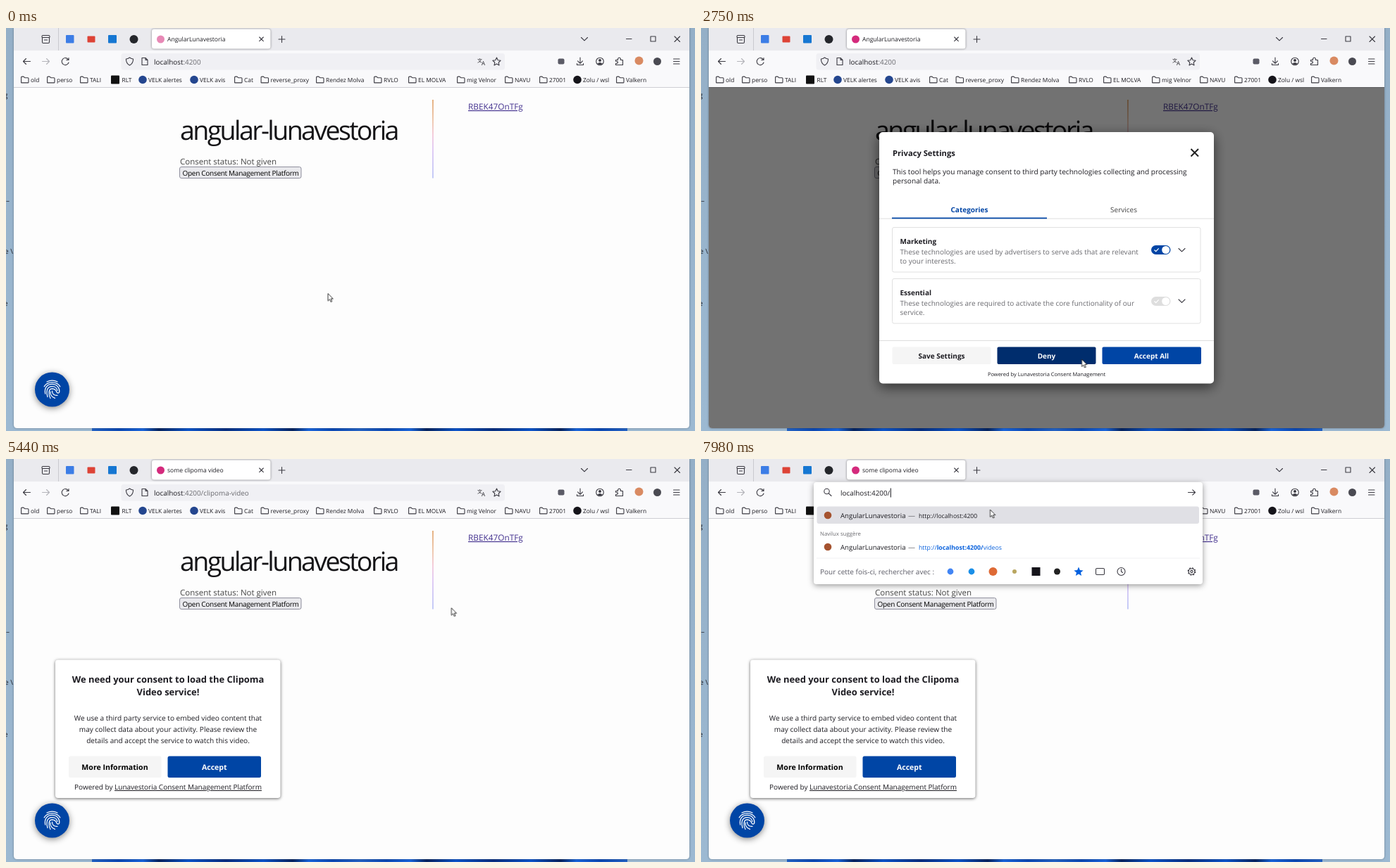
Recreate the animation shown at these times as an HTML page. Size 978x573 px, loop 8 s.

```html
<!DOCTYPE html>
<html lang="en">
<head>
<meta charset="utf-8">
<title>Consent demo</title>
<style>
html, body { margin: 0; width: 100%; height: 100%; overflow: hidden; background: #96b1c9; }
svg { display: block; width: 100%; height: 100%; }
text { font-family: "Open Sans", "Noto Sans", sans-serif; fill: #1d1c22; font-size: 10px; white-space: pre; text-rendering: geometricPrecision; }
.b { font-weight: 700; }
.mid { text-anchor: middle; }
.grey { fill: #6b6b70; }
.white { fill: #fff; }
.link { text-decoration: underline; }
.mark { font-size: 8.4px; }
.tab { font-size: 8.55px; }
.url { font-size: 9.9px; }
.line { fill: none; stroke: #3b3a42; stroke-width: 1.1; stroke-linecap: round; stroke-linejoin: round; }
.drop { filter: drop-shadow(0 2px 4px #0006); }

/* one loop is 8 s, so 1% is 80 ms */
.sw { animation: 8s step-end infinite; }
#favicon { animation-name: favicon; }
#finger { animation-name: finger; }
#homeTab { animation-name: before; }
#videoTab, #card { animation-name: after; }
#path { animation-name: path; }
#wide { animation-name: wide; }
#short { animation-name: short; }
#deny { animation-name: deny; }
#arrow { animation-name: arrow; }
#hand { animation-name: hand; }
#beam { animation-name: beam; }
#press { animation-name: press; }
#modal { animation: modal 8s linear infinite; }
#select { animation: select 8s linear infinite; transform-origin: 348px 0; }
#cursor { animation: move 8s ease-in-out infinite; }

@keyframes favicon { 0% { opacity: .55 } .85% { opacity: 1 } }
@keyframes finger { 0% { opacity: 1 } 16.85% { opacity: 0 } 35.3% { opacity: 1 } }
@keyframes before { 0% { opacity: 1 } 51.2% { opacity: 0 } }
@keyframes after { 0% { opacity: 0 } 51.2% { opacity: 1 } }
@keyframes path { 0% { opacity: 0 } 50.2% { opacity: 1 } }
@keyframes wide { 0% { opacity: 0 } 81.35% { opacity: 1 } 94.45% { opacity: 0 } }
@keyframes short { 0% { opacity: 0 } 94.45% { opacity: 1 } }
@keyframes deny { 0% { fill: #0045a5 } 26.5% { fill: #002d6d } }
@keyframes arrow { 0% { opacity: 1 } 11.6% { opacity: 0 } 18.6% { opacity: 1 } 49.4% { opacity: 0 } 60% { opacity: 1 } 77% { opacity: 0 } 97% { opacity: 1 } }
@keyframes hand { 0% { opacity: 0 } 11.6% { opacity: 1 } 18.6% { opacity: 0 } 49.4% { opacity: 1 } 60% { opacity: 0 } }
@keyframes beam { 0% { opacity: 0 } 77% { opacity: 1 } 97% { opacity: 0 } }
@keyframes press { 0% { opacity: 0 } 14.6% { opacity: 1 } 16.4% { opacity: 0 } 32% { opacity: 1 } 33.8% { opacity: 0 } 49.8% { opacity: 1 } 51.2% { opacity: 0 } 80.3% { opacity: 1 } 91.95% { opacity: 0 } }
@keyframes modal { 0%, 19.9% { opacity: 0 } 23.5%, 35.3% { opacity: 1 } 35.31%, 100% { opacity: 0 } }
@keyframes select { 0%, 81.4% { transform: scaleX(0) } 85.4% { transform: scaleX(.88) } 89.5%, 94.44% { transform: scaleX(1) } 94.45%, 100% { transform: scaleX(0) } }
@keyframes move {
  0% { transform: translate(457px, 377.5px) }
  2.5% { transform: translate(456px, 376px) }
  12.75%, 17.75% { transform: translate(66px, 512px); animation-timing-function: ease-in }
  19.5% { transform: translate(175px, 496.5px); animation-timing-function: ease-out }
  28.5%, 41% { transform: translate(540.5px, 471px) }
  50%, 59.3% { transform: translate(705px, 115px) }
  62%, 65.2% { transform: translate(687px, 243px) }
  74.6%, 75.4% { transform: translate(393px, 75px) }
  79.5%, 81.4% { transform: translate(359px, 48px) }
  85.4%, 86% { transform: translate(288px, 45px) }
  89.5%, 95% { transform: translate(280px, 43px) }
  99.5%, 100% { transform: translate(410.5px, 72px) }
}
</style>
</head>
<body>
<svg viewBox="0 0 978 573">
  <defs>
    <linearGradient id="desk" x2="0" y2="1">
      <stop stop-color="#94afc7"/><stop offset="1" stop-color="#9cb9d2"/>
    </linearGradient>
    <linearGradient id="bloom" x2=".25" spreadMethod="reflect">
      <stop stop-color="#2463c4"/><stop offset=".2" stop-color="#0c49b4"/><stop offset=".38" stop-color="#1a66dd"/>
      <stop offset=".5" stop-color="#06245f"/><stop offset=".72" stop-color="#0d55cc"/><stop offset="1" stop-color="#072f80"/>
    </linearGradient>
    <linearGradient id="rainbow" x2="0" y2="1">
      <stop stop-color="#d98a40"/><stop offset=".28" stop-color="#e8b08c"/><stop offset=".45" stop-color="#f0b4cc"/>
      <stop offset=".62" stop-color="#d4b2f0"/><stop offset="1" stop-color="#a4b0f4"/>
    </linearGradient>
    <path id="folder" class="line" d="M.6 9V1.6Q.6.6 1.6.6H4L5.600 2.200H10Q11 2.200 11 3.200V8.400Q11 9.400 10 9.400H1.200Q.6 9.400 .6 9Z"/>
    <path id="chev" class="line" d="M-4.500-2 0 2.400 4.500-2"/>
    <g id="engines">
      <path d="M164 141H708" stroke="#f0f0f2"/>
      <text x="169" y="164" style="fill:#5b5b66">Pour cette fois-ci, rechercher avec :</text>
      <circle cx="354" cy="160" r="4.400" fill="#4285f4"/>
      <circle cx="384" cy="160" r="4.400" fill="#1a8fe8"/>
      <circle cx="414.500" cy="160" r="6" fill="#de6a35"/>
      <circle cx="445" cy="160" r="3" fill="#b9a660"/>
      <rect x="469.500" y="154" width="12" height="12" fill="#15141a"/>
      <circle cx="505.500" cy="160" r="4.500" fill="#222"/>
      <path d="M536 153.600 537.900 158 542.600 158.400 539 161.500 540.100 166 536 163.600 531.900 166 533 161.500 529.400 158.400 534.100 158Z" fill="#0060df"/>
      <rect class="line" x="560.500" y="155.500" width="12" height="9" rx="1.500"/>
      <circle class="line" cx="596.500" cy="160" r="5.500"/><path class="line" d="M596.500 156.500V160L598.500 161.500"/>
      <circle cx="696.500" cy="160" r="5.200" fill="none" stroke="#3b3a42" stroke-width="1.300" stroke-dasharray="2.040"/>
      <circle class="line" cx="696.500" cy="160" r="4.300"/><circle class="line" cx="696.500" cy="160" r="1.600"/>
    </g>
    <g id="result">
      <circle cx="180" cy="0" r="5.300" fill="#a5532f"/>
      <text x="198" y="3.700" style="font-size:9.600px">AngularLunavestoria</text>
      <text x="294" y="3.700" class="grey">—</text>
    </g>
  </defs>

  <!-- desktop -->
  <rect width="978" height="573" fill="url(#desk)"/>
  <rect x="122" y="569" width="760" height="4" fill="url(#bloom)"/>
  <g class="mark"><text x="-3" y="99">g</text><text x="0" y="249">–</text><text x="-2" y="321">e \</text><text x="-3" y="395">e</text></g>

  <!-- window -->
  <path d="M11 0H970V564Q970 569 965 569H16Q11 569 11 564Z" fill="#fdfdfd" style="filter:drop-shadow(0 0 1.500px #0005)"/>
  <rect x="11" width="959" height="32" fill="#eaeaee"/>
  <rect x="11" y="32" width="959" height="52" fill="#f9f9fb"/>
  <path d="M11 84.500H970" stroke="#cfcfd4"/>
  <path d="M74.500 0V32" stroke="#c9c9cf"/>
  <rect x="207" y="1.500" width="168.500" height="28" rx="3.500" fill="#fff" style="filter:drop-shadow(0 0 1.500px #0007)"/>
  <path class="line" d="M51.500 13.500H61.500V20Q61.500 21.500 60 21.500H53Q51.500 21.500 51.500 20ZM51 13V12Q51 10.500 52.500 10.500H60.500Q62 10.500 62 12V13M54.500 17H58.500"/>
  <rect x="85" y="10" width="11.500" height="11.500" rx="1" fill="#3c7de6"/>
  <rect x="115.500" y="11.500" width="11" height="9" rx="1" fill="#dd4336"/>
  <rect x="145" y="10" width="12" height="11.500" rx="1" fill="#1677d2"/>
  <circle cx="181.500" cy="16" r="6" fill="#24262b"/>
  <circle id="favicon" class="sw" cx="219.500" cy="16" r="5.500" fill="#d42a7c"/>
  <text id="homeTab" class="tab sw" x="229" y="19.300">AngularLunavestoria</text>
  <text id="videoTab" class="tab sw" x="229" y="19.300">some clipoma video</text>
  <path class="line" d="M359.700 13 365.300 18.600M365.300 13 359.700 18.600M387 16H396M391.500 11.500V20.500M880.500 15.500H888M915 12H922V19H915ZM949 12 956.500 19.500M956.500 12 949 19.500"/>
  <use href="#chev" x="821" y="15.500"/>

  <!-- toolbar -->
  <path class="line" d="M34.500 47.500H24.500M28.500 43.500 24.500 47.500 28.500 51.500M88.500 45A5 5 0 1 0 89 49M89 42.500V45.500H85.800"/>
  <path class="line" style="stroke:#b4b4ba" d="M51.500 47.500H61.500M57.500 43.500 61.500 47.500 57.500 51.500"/>
  <rect x="163.500" y="36" width="544.500" height="23.500" rx="3.500" fill="#f0f0f4"/>
  <rect x="783.500" y="43.500" width="9" height="8" rx="2" fill="#5b5b66"/>
  <path class="line" d="M815 42V50M811.500 46.800 815 50.300 818.500 46.800M810.500 50.500V52.500H819.500V50.500"/>
  <circle class="line" cx="843" cy="47.500" r="5.300"/><circle cx="843" cy="46" r="2" fill="#3b3a42"/><path d="M839.500 50.500Q843 47.500 846.500 50.500Q843 53.500 839.500 50.500Z" fill="#3b3a42"/>
  <path class="line" d="M865.500 45.500H868.500V43.500Q870.500 41 872.500 43.500V45.500H875.500V52.500H865.500V50.500Q868.500 50.500 868.500 48.800T865.500 47.200Z"/>
  <circle cx="898.500" cy="46.500" r="6" fill="#d98a62"/>
  <circle cx="924.500" cy="47.500" r="5.500" fill="#4a4a52"/>
  <path class="line" d="M947.500 44H956M947.500 47.500H956M947.500 51H956"/>
  <g id="marks"></g>

  <!-- page -->
  <text x="247" y="159" style="font-size:37.500px;letter-spacing:-2.600px;fill:#151417">angular-lunavestoria</text>
  <text x="247" y="193.500" style="font-size:11.500px;fill:#444">Consent status: Not given</text>
  <rect x="246.500" y="197.500" width="172.500" height="16" rx="2.500" fill="#e9e9ed" stroke="#8f8f9d"/>
  <text x="250.500" y="209.800" style="letter-spacing:-.29px;fill:#000">Open Consent Management Platform</text>
  <rect x="605.300" y="102" width="1.300" height="111.500" fill="url(#rainbow)"/>
  <text x="656" y="116" class="link" style="font-size:11.800px;fill:#44328f">RBEK47OnTFg</text>

  <g id="finger" class="sw">
    <circle cx="65.500" cy="514" r="24.500" fill="#0045a5" style="filter:drop-shadow(0 2px 5px #0007)"/>
    <g transform="translate(65.500 514)" fill="none" stroke="#fff" stroke-width="1.250" stroke-linecap="round">
      <path d="M-7.500-11Q0-14.600 7.500-11M-11.300-4.200C-6.500-12 6.500-12 11.300-4.200"/>
      <path d="M-9.800 6C-11.500-2.500-7-7.600 0-7.600S10.800-2 10.300 3.200Q9.300 6.200 7 4.500C5.500 2.500 5.500-1.200 0-1.200"/>
      <path d="M-6.500 10.500C-9 2-7-4.500 0-4.500 5-4.500 7-1 7.300 1.500"/>
      <path d="M-2.500 12.500C-5.500 7-5.500-1.200 0-1.200M0 2C0 6.500 3 8.800 7.500 8.300M4 12.300C-1 11-3 6.500-2.500 3"/>
    </g>
  </g>

  <g id="card" class="sw">
    <rect x="70" y="285.500" width="319.500" height="196.500" rx="4" fill="#fff" style="filter:drop-shadow(0 1px 2px #0009)"/>
    <g class="mid">
      <g class="b">
        <text x="230" y="318" style="font-size:12.950px">We need your consent to load the Clipoma</text>
        <text x="230" y="336" style="font-size:12.950px">Video service!</text>
      </g>
      <text x="230" y="372" style="font-size:10.100px">We use a third party service to embed video content that</text>
      <text x="230" y="388" style="font-size:10.100px">may collect data about your activity. Please review the</text>
      <text x="230" y="403.500" style="font-size:10.100px">details and accept the service to watch this video.</text>
      <rect x="89" y="422.500" width="131.500" height="30.500" rx="2.500" fill="#f5f5f5"/>
      <rect x="229.500" y="422.500" width="132.500" height="30.500" rx="2.500" fill="#0045a5"/>
      <text x="154.500" y="442" class="b" style="font-size:10.600px;fill:#000">More Information</text>
      <text x="295.800" y="442" class="b white" style="font-size:10.600px">Accept</text>
      <text x="230" y="470">Powered by <tspan class="link">Lunavestoria Consent Management Platform</tspan></text>
    </g>
  </g>

  <g id="modal">
    <path d="M11 84H970V564Q970 569 965 569H16Q11 569 11 564Z" fill="#000" opacity=".55"/>
    <rect x="253" y="148" width="475" height="357.500" rx="5" fill="#fff" style="filter:drop-shadow(0 5px 9px #0009)"/>
    <path d="M695.500 172 706 182.500M706 172 695.500 182.500" stroke="#222" stroke-width="2"/>
    <text x="272" y="182" class="b" style="font-size:11.200px">Privacy Settings</text>
    <text x="272" y="208" style="font-size:10.130px">This tool helps you manage consent to third party technologies collecting and processing</text>
    <text x="272" y="221" style="font-size:10.130px">personal data.</text>
    <text x="381" y="262" class="b mid" style="fill:#0045a5">Categories</text>
    <text x="600" y="262" class="mid" style="fill:#444">Services</text>
    <path d="M253 271H728M253 444.500H728" stroke="#dedede"/>
    <path d="M271 270.300H491" stroke="#0045a5" stroke-width="1.700"/>
    <g fill="none" stroke="#e0e0e0"><rect x="271.500" y="283.500" width="437.500" height="63.500" rx="2.500"/><rect x="271.500" y="356.500" width="437.500" height="63.500" rx="2.500"/></g>
    <text x="282.500" y="307" class="b">Marketing</text>
    <text x="282.500" y="322" class="grey">These technologies are used by advertisers to serve ads that are relevant</text>
    <text x="282.500" y="334.500" class="grey">to your interests.</text>
    <text x="282.500" y="379.500" class="b">Essential</text>
    <text x="282.500" y="395" class="grey">These technologies are required to activate the core functionality of our</text>
    <text x="282.500" y="407.500" class="grey">service.</text>
    <rect x="639" y="309" width="27.500" height="13" rx="6.500" fill="#0045a5"/>
    <rect x="639" y="382" width="27.500" height="13" rx="6.500" fill="#dedede"/>
    <g fill="#fff"><circle cx="659.700" cy="315.500" r="5.500"/><circle cx="659.700" cy="388.500" r="5.500"/></g>
    <path d="M643.500 315.500 645.700 317.700 649.700 313.300M643.500 388.500 645.700 390.700 649.700 386.300" fill="none" stroke="#fff" stroke-width="1.200"/>
    <use href="#chev" x="682.500" y="315.500"/><use href="#chev" x="682.500" y="388"/>
    <rect x="271.500" y="453.500" width="140" height="24.500" rx="2" fill="#f5f5f5"/>
    <rect id="deny" class="sw" x="420.500" y="453.500" width="140" height="24.500" rx="2"/>
    <rect x="569.500" y="453.500" width="140.500" height="24.500" rx="2" fill="#0045a5"/>
    <g class="b mid">
      <text x="341.500" y="470">Save Settings</text>
      <text x="490.500" y="470" class="white">Deny</text>
      <text x="639.500" y="470" class="white">Accept All</text>
    </g>
    <text x="490.500" y="495" class="mid" style="font-size:7.500px">Powered by Lunavestoria Consent Management</text>
  </g>

  <!-- address bar, plain and opened -->
  <g id="wide" class="sw">
    <rect x="160" y="33" width="552" height="369" rx="4" fill="#fff" class="drop"/>
    <use href="#result" y="80"/><text x="309" y="83.500" style="font-size:8.600px">http://localhost:4200</text>
    <use href="#engines" y="224"/>
  </g>
  <path class="line" d="M175.500 42Q178 44 180.500 44Q180.800 50 175.500 53Q170.200 50 170.500 44Q173 44 175.500 42ZM193 42.500H198L201 45.500V52.500H193ZM198 42.500V45.500H201M696.500 42 698.200 45.800 702.200 46.200 699.200 49 700 53 696.500 51 693 53 693.800 49 690.800 46.200 694.800 45.800Z"/>
  <text x="669" y="49" style="font-size:7px;font-family:'Noto Sans CJK SC','Noto Sans CJK',sans-serif">文</text><text x="675" y="53" style="font-size:8px">A</text>
  <text class="url" x="210" y="51.500">localhost<tspan class="grey">:4200</tspan><tspan id="path" class="grey sw">/clipoma-video</tspan></text>
  <rect id="select" x="280" y="41.500" width="68" height="13" fill="#0078d7" opacity=".4"/>
  <g id="short" class="sw">
    <rect x="160" y="33" width="552" height="145" rx="4" fill="#fff" class="drop"/>
    <circle class="line" cx="178.500" cy="46" r="3.700"/><path class="line" d="M181.300 48.800 185 52.500M691.500 47.500H701.500M697.800 43.800 701.500 47.500 697.800 51.200"/>
    <text class="url" x="198" y="51.500">localhost:4200/</text>
    <path d="M269.300 41.500V54.500" stroke="#15141a"/>
    <rect x="164.500" y="67.500" width="542.500" height="24.500" rx="3" fill="#e0e0e5"/>
    <use href="#result" y="80"/><text x="309" y="83.500" style="font-size:8.600px">http://localhost:4200</text>
    <text x="169" y="109" class="grey" style="font-size:7.800px">Navilux suggère</text>
    <use href="#result" y="125"/>
    <text x="309" y="128.500" style="font-size:8.750px;fill:#0a62dd">http://<tspan class="b">localhost:4200/</tspan>videos</text>
    <use href="#engines"/>
  </g>

  <g id="cursor">
    <circle id="press" class="sw" r="9" fill="#f4ee4e" fill-opacity=".75"/>
    <path id="arrow" class="sw" d="M0 0V10.500L2.400 8.200 4.100 12 5.800 11.200 4.200 7.600H7.300Z" fill="#fff" stroke="#222" stroke-width=".9"/>
    <path id="hand" class="sw" d="M-1.200 8V1Q0-1 1.200 1V5.200Q2.800 4.200 3.400 5.600Q5 4.800 5.300 6.300Q6.700 6 6.600 7.500V10Q6.300 13.500 4 13.800H0Q-2 11-4 8.200Q-3.500 6.500-1.200 8Z" fill="#fff" stroke="#222" stroke-width=".9"/>
    <path id="beam" class="sw" d="M-2.200-5.500Q0-5.500 0-4.500Q0-5.500 2.200-5.500M0-4.500V4.500M-2.200 5.500Q0 5.500 0 4.500Q0 5.500 2.200 5.500" fill="none" stroke="#333"/>
  </g>
</svg>
<script>
// [icon x, label, icon fill]; a folder when no fill is given
const marks = [
  [21, "old"], [58, "perso"], [105, "TALI"], [149, "RLT", "#111"], [188, "VELK alertes", "#24468f"],
  [261, "VELK avis", "#24468f"], [324, "Cat"], [361.5, "reverse_proxy"], [440, "Rendez Molva"], [522, "RVLO"],
  [571, "EL MOLVA"], [640, "mig Velnor"], [708, "NAVU"], [757, "27001"], [805, "Zolu / wsl", "#15141a"], [866, "Valkern"]
];
document.getElementById("marks").innerHTML = marks.map(([x, label, fill]) => {
  const square = label === "RLT";
  const icon = !fill ? `<use href="#folder" x="${x}" y="68.5"/>`
    : square ? `<rect x="${x}" y="67.5" width="12" height="12" rx="1" fill="${fill}"/>`
    : `<circle cx="${x + 6}" cy="73.5" r="5.8" fill="${fill}"/>`;
  return `${icon}<text class="mark" x="${x + (square ? 15.5 : 14)}" y="76.8">${label}</text>`;
}).join("");
</script>
</body>
</html>
```
